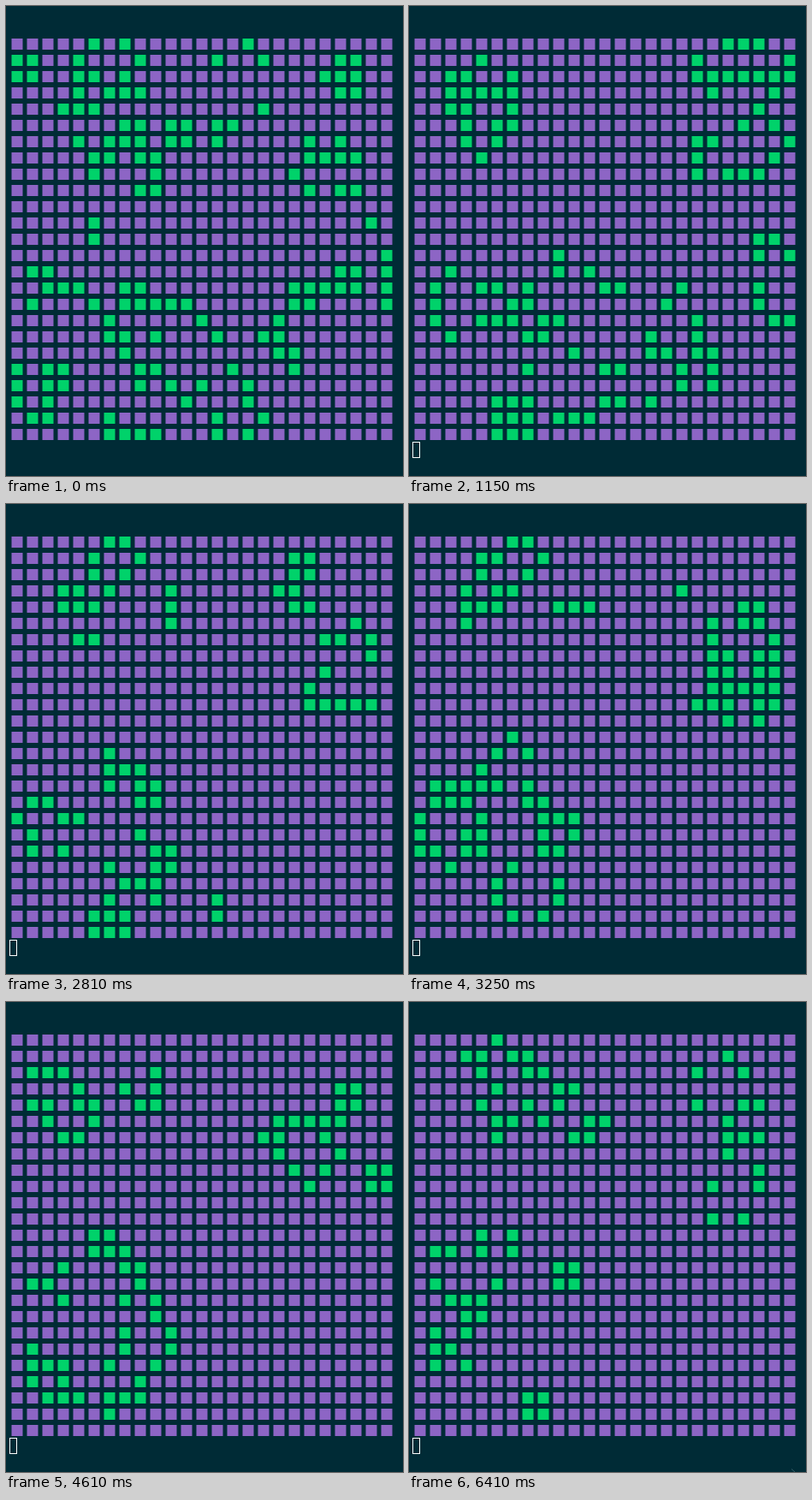
Write an HTML page with a canvas that moves like this. It is 464x549 px and loops after 6460 ms.

```html
<!DOCTYPE html>
<html lang="en">
<head>
<meta charset="utf-8">
<title>Game of Life</title>
<style>
  html, body { margin: 0; width: 100%; height: 100%; overflow: hidden; background: #002b36; }
  canvas { display: block; }
</style>
</head>
<body>
<canvas id="stage" width="464" height="549"></canvas>
<script>
const ctx = document.getElementById('stage').getContext('2d');
const SIZE = 25, LOOP = 6460;

// Live columns in each row of the first generation
const seed = [
  [5, 7, 15],
  [0, 1, 4, 8, 13, 16, 21, 22],
  [0, 1, 4, 5, 7, 20, 21, 22],
  [4, 6, 7, 8, 21, 22],
  [3, 4, 5, 16],
  [7, 8, 10, 11, 13, 14],
  [4, 6, 7, 8, 10, 11, 13, 19, 21],
  [5, 6, 8, 9, 19, 20, 21, 22],
  [5, 9, 18],
  [8, 9, 19, 21, 22],
  [],
  [5, 23],
  [5],
  [24],
  [1, 2, 21, 22, 24],
  [2, 3, 4, 7, 8, 18, 19, 20, 21, 22, 24],
  [1, 5, 7, 8, 9, 10, 11, 18, 19, 24],
  [6, 12, 17],
  [6, 7, 9, 13, 16, 17],
  [7, 17, 18],
  [0, 2, 3, 8, 9, 14, 18],
  [0, 2, 3, 8, 10, 12, 15],
  [0, 2, 11, 15],
  [1, 2, 6, 13, 16],
  [6, 7, 8, 9, 13, 15]
];

// Start time of every generation
const starts = [0, 50];
for (let t = 250; t <= 2650; t += 150) starts.push(t);
starts.push(2810, 2960, 3100, 3250);
for (let t = 3410; t < LOOP; t += 200) starts.push(t);

const makeGrid = alive =>
  Array.from({ length: SIZE }, (_, r) => Array.from({ length: SIZE }, (_, c) => alive(r, c)));

function neighbours(grid, r, c) {
  let n = 0;
  for (let y = r - 1; y <= r + 1; y++)
    for (let x = c - 1; x <= c + 1; x++)
      if ((y !== r || x !== c) && grid[y] && grid[y][x]) n++;
  return n;
}

// Everything outside the grid counts as dead
const evolve = grid => makeGrid((r, c) => {
  const n = neighbours(grid, r, c);
  return n === 3 || (n === 2 && grid[r][c]);
});

const generations = [makeGrid((r, c) => seed[r].includes(c))];
while (generations.length < starts.length) generations.push(evolve(generations.at(-1)));

function draw(t) {
  let g = starts.length - 1;
  while (starts[g] > t) g--;

  ctx.fillStyle = '#002b36';
  ctx.fillRect(0, 0, 464, 549);
  generations[g].forEach((row, r) => row.forEach((alive, c) => {
    ctx.fillStyle = alive ? '#00d26a' : '#8d65c5';
    ctx.fillRect(6.5 + 18 * c, 38 + 19 * r, 13, 13);
  }));

  ctx.lineWidth = 1;
  if (g > 0) {
    ctx.strokeStyle = '#fff';
    ctx.strokeRect(4.5, 509.5, 8, 18);
  }
  // Tip of the pointer at the lower edge
  if (t >= 5310) {
    ctx.strokeStyle = '#35606a';
    ctx.beginPath();
    ctx.moveTo(447, 545.5);
    ctx.lineTo(451, 549);
    ctx.stroke();
  }
}

const origin = performance.now();
function tick() {
  draw((performance.now() - origin) % LOOP);
  requestAnimationFrame(tick);
}
tick();
</script>
</body>
</html>
```
